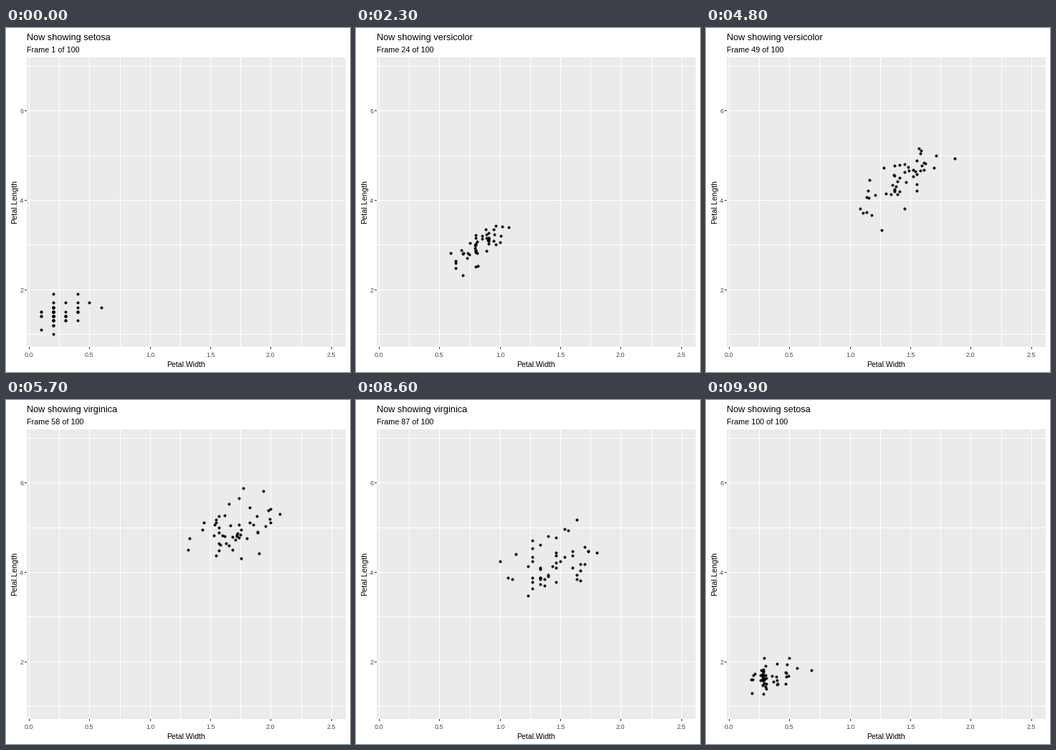
Recreate the animation shown at these times as a matplotlib script. Size 480x480 px, loop 10000 ms.

```python
import matplotlib.pyplot as plt
import numpy as np
from matplotlib.animation import FuncAnimation
from matplotlib.patches import Rectangle
from matplotlib.path import Path

SIZE, FRAMES, INTERVAL = 480, 100, 100
LEFT, TOP, RIGHT, BOTTOM = 29, 41, 474, 445

plt.rcParams["font.family"] = "Liberation Sans"

# Petal widths and lengths in tenths of a centimetre, one pair per flower.
setosa = np.array([
    [2, 2, 2, 2, 2, 4, 3, 2, 2, 1, 2, 2, 1, 1, 2, 4, 4, 3, 3, 3, 2, 4, 2, 5, 2,
     2, 4, 2, 2, 2, 2, 4, 1, 2, 2, 2, 2, 1, 2, 2, 3, 3, 2, 6, 4, 3, 2, 2, 2, 2],
    [14, 14, 13, 15, 14, 17, 14, 15, 14, 15, 15, 16, 14, 11, 12, 15, 13,
     14, 17, 15, 17, 15, 10, 17, 19, 16, 16, 15, 14, 16, 16, 15, 15, 14,
     15, 12, 13, 14, 13, 15, 13, 13, 13, 16, 19, 14, 16, 14, 15, 14],
])
versicolor = np.array([
    [14, 15, 15, 13, 15, 13, 16, 10, 13, 14, 10, 15, 10, 14, 13, 14, 15,
     10, 15, 11, 18, 13, 15, 12, 13, 14, 14, 17, 15, 10, 11, 10, 12, 16,
     15, 16, 15, 13, 13, 13, 12, 14, 12, 10, 13, 12, 13, 13, 11, 13],
    [47, 45, 49, 40, 46, 45, 47, 33, 46, 39, 35, 42, 40, 47, 36, 44, 45,
     41, 45, 39, 48, 40, 49, 47, 43, 44, 48, 50, 45, 35, 38, 37, 39, 51,
     45, 45, 47, 44, 41, 40, 44, 46, 40, 33, 42, 42, 42, 43, 30, 41],
])
virginica = np.array([
    [25, 19, 21, 18, 22, 21, 17, 18, 18, 25, 20, 19, 21, 20, 24, 23, 18,
     22, 23, 15, 23, 20, 20, 18, 21, 18, 18, 18, 21, 16, 19, 20, 22, 15,
     14, 23, 24, 18, 18, 21, 24, 23, 19, 23, 25, 23, 19, 20, 23, 18],
    [60, 51, 59, 56, 58, 66, 45, 63, 58, 61, 51, 53, 55, 50, 51, 53, 55,
     67, 69, 50, 57, 49, 67, 49, 57, 60, 48, 49, 56, 58, 61, 64, 56, 51,
     56, 61, 56, 55, 48, 54, 56, 51, 51, 59, 57, 52, 50, 52, 54, 51],
])

# Each move: first and last step, then the states it joins.
MOVES = [
    (11, 33, ("setosa", setosa), ("versicolor", versicolor)),
    (45, 67, ("versicolor", versicolor), ("virginica", virginica)),
    (79, 100, ("virginica", virginica), ("setosa", setosa)),
]


def px(width):
    return np.floor(474.5 + 168.65 * (np.asarray(width) - 2.62))


def py(length):
    return np.floor(427.5 - 62.37 * (np.asarray(length) - 1))


def state_at(step):
    """Name of the nearest state and the blended measurements in cm."""
    for start, end, (name_a, a), (name_b, b) in MOVES:
        if step <= end:
            t = max(0, (step - start) / (end - start))
            name = name_b if t > 0.5 else name_a
            return name, (a + (b - a) * t) / 10


fig = plt.figure(figsize=(SIZE / 72, SIZE / 72), dpi=72, facecolor="white")
ax = fig.add_axes([0, 0, 1, 1])
ax.set(xlim=(0, SIZE), ylim=(SIZE, 0))
ax.axis("off")


def box(x, y, w, h, color):
    ax.add_patch(Rectangle((x, y), w, h, facecolor=color, linewidth=0))


def label(x, y, text, size, color="black", **kw):
    return ax.text(x, y, text, fontsize=size, color=color,
                   **{"va": "baseline", **kw})


box(LEFT, TOP, RIGHT - LEFT, BOTTOM - TOP, "#EBEBEB")
for x in px(np.arange(0, 2.6, 0.25)):
    box(x, TOP, 1, BOTTOM - TOP, "white")
for y in py(np.arange(1, 8)):
    box(LEFT, y, RIGHT - LEFT, 1, "white")

for value in np.arange(0, 2.6, 0.5):
    x = px(value)
    box(x, BOTTOM, 1, 3, "#333333")
    label(x + 0.3, 459, f"{value:.1f}", 9, "#4D4D4D", ha="center")
for value in (2, 4, 6):
    y = py(value)
    box(LEFT - 3, y, 3, 1, "#333333")
    label(24.3, y + 4, str(value), 9, "#4D4D4D", ha="right")

label(224, 473, "Petal.Width", 10.5)
label(15, 273, "Petal.Length", 10.75, rotation=90, ha="right", va="bottom",
      rotation_mode="default").set(ha="left", va="baseline",
                                   rotation_mode="anchor")
title = label(29, 17, "", 12.75)
subtitle = label(29, 34, "", 10.75)

# A four-pixel dot with its corners cut.
dot = Path([(-1, -2), (1, -2), (1, -1), (2, -1), (2, 1), (1, 1), (1, 2),
            (-1, 2), (-1, 1), (-2, 1), (-2, -1), (-1, -1), (-1, -2)])
points = ax.scatter([0] * 50, [0] * 50, s=16, marker=dot, color="black",
                    linewidths=0, zorder=3, snap=False)


def draw(step):
    name, (width, length) = state_at(step)
    points.set_offsets(np.column_stack([px(width), py(length)]))
    title.set_text(f"Now showing {name}")
    subtitle.set_text(f"Frame {step + 1} of {FRAMES}")
    return points, title, subtitle


anim = FuncAnimation(fig, draw, frames=FRAMES, interval=INTERVAL,
                     repeat=True, repeat_delay=0, blit=False)
plt.show()
```
